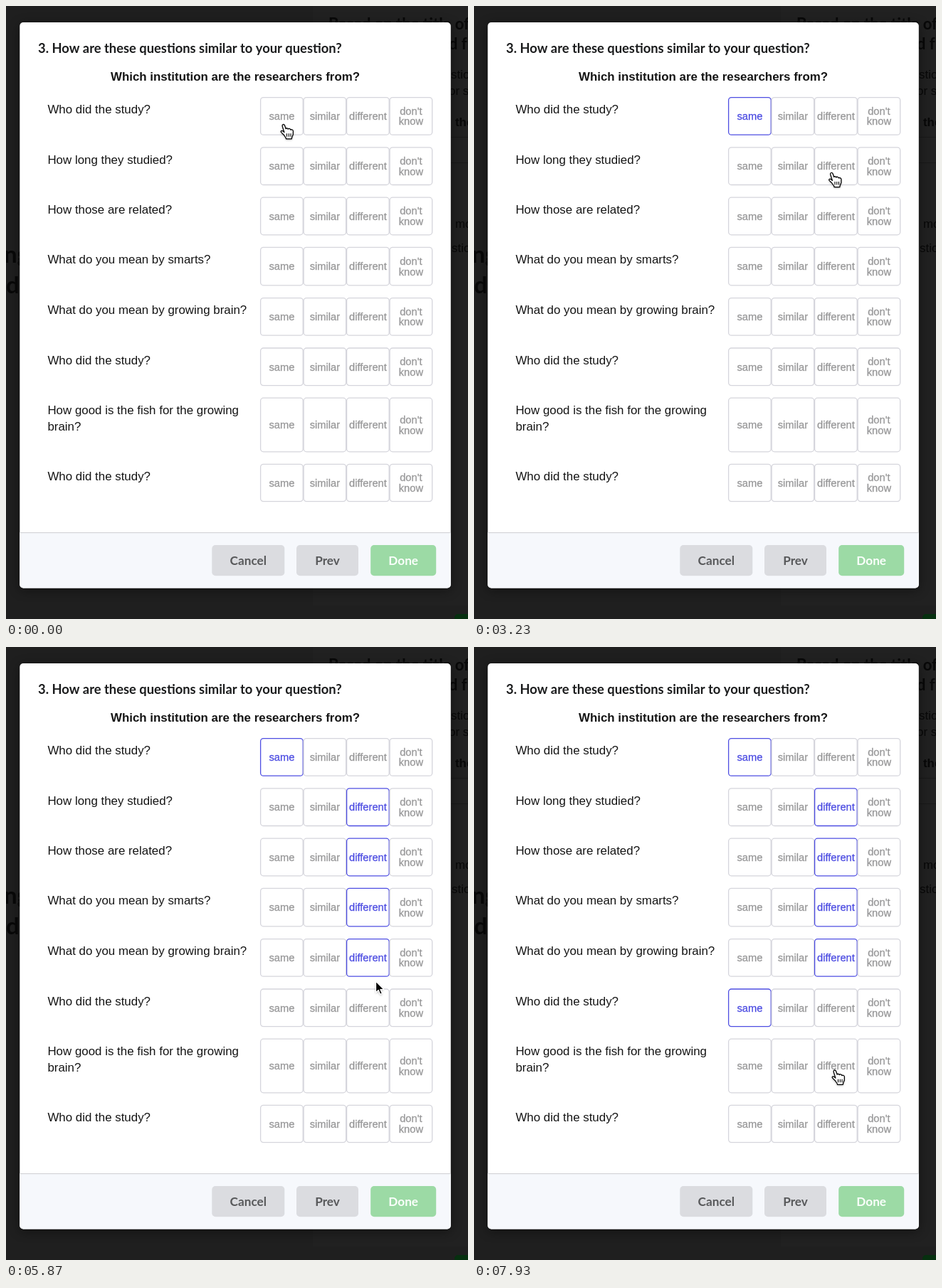
Animation, 649 px wide and 862 px high, one loop 8 s. Source, as an HTML page with a canvas:

```html
<!DOCTYPE html>
<html lang="en">
<head>
<meta charset="utf-8">
<title>Question similarity</title>
<style>
html, body { margin: 0; width: 100%; height: 100%; overflow: hidden; background: #1f1f1f; }
canvas { display: block; width: 649px; height: 862px; }
</style>
</head>
<body>
<canvas id="stage" width="649" height="862"></canvas>
<script>
const ctx = document.getElementById('stage').getContext('2d');
const LOOP = 8000;
const SANS = '"Liberation Sans", Arial, sans-serif';
const LATO = 'Lato, sans-serif';
const GRAY_TEXT = [152, 152, 153], GRAY_LINE = [213, 213, 220], BLUE = [78, 78, 226];
const COLUMN_X = 357.6, COLUMN_STEP = 60.5, CELL_WIDTH = 59.6;
const OPTIONS = [['same'], ['similar'], ['different'], ["don't", 'know']];

// pick: chosen option, at: time of the click
const ROWS = [
  { y: 128.6, h: 52.6, text: ['Who did the study?'], pick: 0, at: 730 },
  { y: 198.9, h: 52.6, text: ['How long they studied?'], pick: 2, at: 3430 },
  { y: 269.2, h: 52.6, text: ['How those are related?'], pick: 2, at: 4030 },
  { y: 339.4, h: 53.4, text: ['What do you mean by smarts?'], pick: 2, at: 4530 },
  { y: 410.6, h: 52.6, text: ['What do you mean by growing brain?'], pick: 2, at: 5400 },
  { y: 481, h: 52.6, text: ['Who did the study?'], pick: 0, at: 6730 },
  { y: 551.2, h: 75.6, text: ['How good is the fish for the growing', 'brain?'] },
  { y: 644.4, h: 52.2, text: ['Who did the study?'] }
];
const FADE = 280;

// Pointer stops: time, x, y
const PATH = [
  [0, 390.5, 166.5], [330, 390.5, 166.5], [500, 396, 168.7], [1970, 396, 168.7],
  [2770, 502.5, 233.5], [3000, 503, 234.3], [3480, 503, 234.3], [3800, 506, 301],
  [4130, 506, 301], [4500, 512, 363.3], [4900, 512, 363.3], [5330, 512, 437],
  [5730, 512, 437], [5870, 519.5, 470], [6330, 419.5, 514], [6470, 394, 514.6],
  [7270, 394, 514.6], [7930, 507.5, 595], [8000, 507.5, 595]
];

const HAND = new Path2D('M-2.3 2.6 C-3 .2 -.2 -1 .9 1.2 L2.7 6.2 C3.2 4.8 5.2 5 5.6 6.7 ' +
  'C6.4 5.4 8.8 5.8 9.3 7.6 C10.8 6.7 12.8 7.6 12.9 9.5 L12.8 14 C12.4 16 11 17 10.8 20.3 ' +
  'L3 20.3 C3 17.8 .8 16.4 -.7 14.2 L-3.9 11.1 C-5.2 9.4 -3.1 8.2 -1.5 9.5 L.4 11.1 Z');
const HAND_LINES = new Path2D('M4 12.7 V17.2 M6.8 12.7 V17.2 M9.5 12.7 V17.2');
const ARROW = new Path2D('M0 0 V16 L3.7 12.5 L6.2 18.4 L8.9 17.2 L6.4 11.6 H11.4 Z');

function label(str, x, y, font, color, align = 'left') {
  ctx.font = font;
  ctx.fillStyle = color;
  ctx.textAlign = align;
  ctx.fillText(str, x, y);
}

function box(x, y, w, h, r, fill, stroke) {
  ctx.beginPath();
  ctx.roundRect(x, y, w, h, r);
  if (fill) { ctx.fillStyle = fill; ctx.fill(); }
  if (stroke) { ctx.strokeStyle = stroke; ctx.stroke(); }
}

function shadow(color, blur, dy) {
  ctx.shadowColor = color;
  ctx.shadowBlur = blur;
  ctx.shadowOffsetY = dy;
}

const mix = (a, b, k) => `rgb(${a.map((v, i) => Math.round(v + (b[i] - v) * k))})`;
const clamp = v => Math.max(0, Math.min(1, v));

// Monotone cubic interpolation, so held stops stay still.
function pathAt(t, axis) {
  let i = 0;
  while (i < PATH.length - 2 && t >= PATH[i + 1][0]) i++;
  const slope = n => n < 0 || n > PATH.length - 2 ? 0
    : (PATH[n + 1][axis] - PATH[n][axis]) / (PATH[n + 1][0] - PATH[n][0]);
  const tangent = n => {
    const a = slope(n - 1), b = slope(n);
    return a * b > 0 ? 2 * a * b / (a + b) : 0;
  };
  const span = PATH[i + 1][0] - PATH[i][0];
  const u = (t - PATH[i][0]) / span, v = 1 - u;
  return PATH[i][axis] * v * v * (1 + 2 * u) + PATH[i + 1][axis] * u * u * (3 - 2 * u)
    + span * (tangent(i) * u * v * v - tangent(i + 1) * u * u * v);
}

function drawPage() {
  ctx.fillStyle = '#1f1f1f';
  ctx.fillRect(0, 0, 649, 862);
  ctx.fillStyle = '#212121';
  ctx.fillRect(431, 0, 218, 843);
  ctx.fillStyle = '#191919';
  ctx.fillRect(431, 184, 218, 1);
  ctx.fillRect(431, 220, 218, 1);
  const ink = '#080808';
  label('Based on the title of', 453, 33, `700 22px ${LATO}`, ink);
  label('d from', 622, 61, `700 22px ${LATO}`, ink);
  [['stions', 625, 102], ['or so', 622, 125], ['more', 631, 312], ['stions', 626, 346]]
    .forEach(([s, x, y]) => label(s, x, y, `16.9px ${SANS}`, ink));
  label('the', 631, 169, `700 16.9px ${SANS}`, ink);
  label('ng', -3, 361, `700 33px ${LATO}`, ink);
  label('d', 0, 404, `700 33px ${LATO}`, ink);
  box(630, 855, 60, 40, 5, '#06300f');
}

function drawDialog() {
  ctx.save();
  shadow('rgba(0,0,0,.45)', 15, 3);
  box(19.3, 23, 605.5, 795.5, 5, '#fff');
  ctx.restore();
  box(19.3, 740, 605.5, 78.5, [0, 0, 5, 5], '#f6f8fc');
  ctx.fillStyle = '#d3d4d7';
  ctx.fillRect(19.3, 740, 605.5, 1.2);

  label('3. How are these questions similar to your question?', 45, 66.3, `700 18.35px ${LATO}`, '#1b1c1d');
  label('Which institution are the researchers from?', 322, 105.2, `700 16.9px ${SANS}`, '#151515', 'center');

  [['Cancel', 289.3, 102, '#dbdce0', '#58595b'],
   ['Prev', 408, 87, '#dbdce0', '#58595b'],
   ['Done', 512.2, 92, '#9cdaa5', '#fafffb']].forEach(([name, x, w, fill, color]) => {
    box(x, 758, w, 43.3, 5, fill);
    label(name, x + w / 2, 785.7, `700 17.2px ${LATO}`, color, 'center');
  });
}

function drawRow(row, t) {
  row.text.forEach((s, i) => label(s, 58.4, row.y + 22.8 + i * 23, `16.9px ${SANS}`, '#151515'));
  const chosen = row.at ? clamp((t - row.at) / FADE) : 0;
  const middle = row.y + row.h / 2;
  OPTIONS.forEach((lines, col) => {
    const k = col === row.pick ? chosen : 0;
    const x = COLUMN_X + col * COLUMN_STEP;
    ctx.lineWidth = 1.3;
    box(x, row.y, CELL_WIDTH, row.h, 4, null, mix(GRAY_LINE, BLUE, k));
    const color = mix(GRAY_TEXT, BLUE, k);
    lines.forEach((s, i) => {
      const cx = x + CELL_WIDTH / 2;
      const y = middle + 5.2 + (i - (lines.length - 1) / 2) * 14.6;
      label(s, cx, y, `14.7px ${SANS}`, color, 'center');
      ctx.lineWidth = 0.3;
      ctx.strokeStyle = color;
      ctx.strokeText(s, cx, y);
    });
  });
}

function overButton(x, y) {
  return x > COLUMN_X && x < COLUMN_X + 4 * COLUMN_STEP
    && ROWS.some(r => y > r.y && y < r.y + r.h);
}

function drawPointer(t) {
  const x = pathAt(t, 1), y = pathAt(t, 2);
  const hand = overButton(x, y);
  const shape = hand ? HAND : ARROW;
  ctx.save();
  ctx.translate(x, y);
  ctx.lineJoin = 'round';
  shadow('rgba(0,0,0,.35)', 3, 1.5);
  ctx.fillStyle = hand ? '#fff' : '#000';
  ctx.fill(shape);
  shadow('transparent', 0, 0);
  ctx.lineWidth = 1.3;
  ctx.strokeStyle = hand ? '#000' : '#fff';
  ctx.stroke(shape);
  if (hand) {
    ctx.lineWidth = 1.1;
    ctx.stroke(HAND_LINES);
  }
  ctx.restore();
}

function draw(now) {
  const t = now % LOOP;
  drawPage();
  drawDialog();
  ROWS.forEach(row => drawRow(row, t));
  drawPointer(t);
}

let start;
function frame(now) {
  start ??= now;
  draw(now - start);
  requestAnimationFrame(frame);
}
draw(0);
requestAnimationFrame(frame);
</script>
</body>
</html>
```
